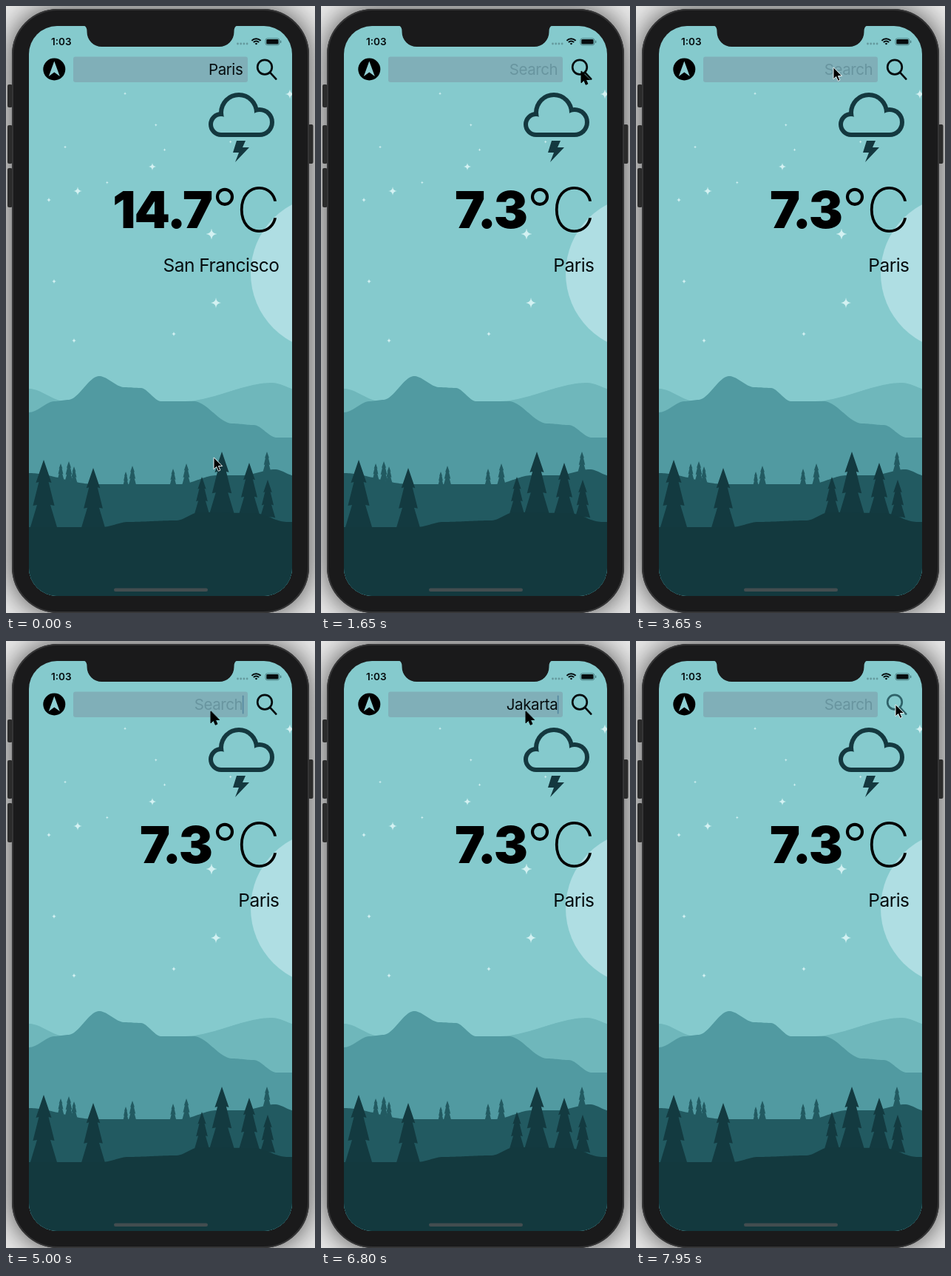
These frames come from a looping animation (418x820 px, 8 s). An HTML page with a canvas:

```html
<!DOCTYPE html>
<html lang="en">
<head>
<meta charset="utf-8">
<title>Weather app</title>
<style>
  html, body { margin: 0; width: 100%; height: 100%; overflow: hidden; background: #aaa; }
  canvas { display: block; width: 418px; height: 820px; }
</style>
</head>
<body>
<canvas id="stage"></canvas>
<script>
const W = 418, H = 820, LOOP = 8000;
const LEFT = 31, RIGHT = 387, TOP = 27, BOTTOM = 797;
const SKY = '#85cacd', DARK = '#14383f', INK = '#050c0e', SHELL = '#1a1a1b';
const FONT = 'Inter, Roboto, "Liberation Sans", sans-serif';
const TAU = Math.PI * 2;
const dpr = window.devicePixelRatio || 1;

const clamp = p => Math.min(1, Math.max(0, p));
const ease = p => p * p * (3 - 2 * p);
const between = (t, a, b) => t >= a && t < b;

function prepare(cv) {
  cv.width = W * dpr;
  cv.height = H * dpr;
  const g = cv.getContext('2d');
  g.scale(dpr, dpr);
  return g;
}

const view = prepare(document.getElementById('stage'));
const backdrop = document.createElement('canvas');
let ctx = prepare(backdrop);

function seeded(seed) {
  return () => (seed = seed * 16807 % 2147483647) / 2147483647;
}

function poly(color, pts) {
  ctx.beginPath();
  pts.forEach(([x, y]) => ctx.lineTo(x, y));
  ctx.closePath();
  ctx.fillStyle = color;
  ctx.fill();
}

function disc(color, x, y, r) {
  ctx.beginPath();
  ctx.arc(x, y, r, 0, TAU);
  ctx.fillStyle = color;
  ctx.fill();
}

function ring(color, x, y, r, width) {
  ctx.beginPath();
  ctx.arc(x, y, r, 0, TAU);
  ctx.strokeStyle = color;
  ctx.lineWidth = width;
  ctx.stroke();
}

function box(color, x, y, w, h, r = 0) {
  ctx.beginPath();
  ctx.roundRect(x, y, w, h, r);
  ctx.fillStyle = color;
  ctx.fill();
}

function label(str, x, y, size, weight, color, align = 'right', spacing = 0) {
  ctx.font = `${weight} ${size}px ${FONT}`;
  ctx.letterSpacing = spacing + 'px';
  ctx.textAlign = align;
  ctx.fillStyle = color;
  ctx.fillText(str, x, y);
}

// Height of a ridge that eases from each key point to the next.
const slope = keys => x => keys.reduce((y, [kx, ky], i) => {
  if (!i) return ky;
  const from = keys[i - 1][0];
  return y + (ky - y) * ease(clamp((x - from) / (kx - from)));
}, 0);

const peaks = slope([[31, 517], [80, 534], [240, 534], [360, 509], [400, 520]]);
const mountain = slope([[31, 549], [66, 534], [84, 532], [126, 500], [160, 515],
  [182, 516], [210, 534], [254, 534], [306, 564], [335, 566], [366, 583]]);
const hill = slope([[31, 631], [120, 646], [235, 646], [285, 634], [320, 634], [364, 626], [392, 635]]);
const ground = slope([[31, 704], [130, 704], [165, 697], [230, 695], [262, 684], [335, 685], [380, 697]]);

function ridge(color, height) {
  const pts = [[LEFT, H]];
  for (let x = LEFT; x <= RIGHT; x += 2) pts.push([x, height(x)]);
  poly(color, [...pts, [RIGHT, H]]);
}

function tree(color, x, top, height) {
  const h = height(x) + 2 - top, half = h * 0.2, tiers = 3;
  const side = [];
  for (let i = 1; i <= tiers; i++) {
    const p = i / tiers, out = (0.35 + 0.65 * p) * half, y = top + p * h;
    side.push([out, y], [out * 0.62, y - 1]);
  }
  const mirrored = side.map(([dx, y]) => [x - dx, y]).reverse();
  poly(color, [[x, top], ...side.map(([dx, y]) => [x + dx, y]), ...mirrored]);
}

function star(x, y, r) {
  const c = r * 0.12;
  ctx.beginPath();
  ctx.moveTo(x + r, y);
  for (let i = 1; i <= 4; i++) {
    const a = i * TAU / 4, mid = a - TAU / 8;
    ctx.quadraticCurveTo(x + c * Math.cos(mid), y + c * Math.sin(mid),
      x + r * Math.cos(a), y + r * Math.sin(a));
  }
  ctx.fillStyle = '#d3f1f2';
  ctx.fill();
}

function drawStars() {
  const bright = [[278, 308], [284, 401], [384, 119], [97, 250], [198, 217]];
  const faint = [[58, 262], [65, 372], [92, 452], [227, 443]];
  bright.forEach(([x, y], i) => star(x, y, 7.5 - i * 0.6));
  faint.forEach(([x, y]) => star(x, y, 3.2));
  const rnd = seeded(11);
  for (let i = 0; i < 6; i++) star(80 + rnd() * 260, 110 + rnd() * 180, 2);
}

function drawBody() {
  box('#ebebeb', 0, 0, W, H);
  ctx.save();
  ctx.shadowColor = 'rgba(0,0,0,.72)';
  ctx.shadowBlur = 38 * dpr;
  box(SHELL, 8, 4, 402, 816, 62);
  ctx.restore();
  [[2, 106, 31], [2, 161, 52], [2, 219, 53], [409, 160, 53]].forEach(([x, y, h]) =>
    box('#2b2b2b', x, y, 6.5, h, 2));
  ctx.beginPath();
  ctx.roundRect(9, 5, 400, 814, 61);
  ctx.strokeStyle = '#353536';
  ctx.lineWidth = 2;
  ctx.stroke();
}

function drawCloud() {
  const lobes = (color, inset) => {
    disc(color, 291, 160, 17 - inset);
    disc(color, 315, 144, 27 - inset);
    disc(color, 343, 157, 20 - inset);
    box(color, 291, 150, 52, 27 - inset);
  };
  lobes(DARK, 0);
  lobes(SKY, 6);
  poly(DARK, [[312, 182], [324, 182], [320, 191], [329, 191], [310, 211], [315, 198], [307, 198]]);
}

function drawScene() {
  box(SKY, LEFT, TOP, RIGHT - LEFT, BOTTOM - TOP);
  disc('#afdee3', 436, 361, 105);
  drawCloud();
  drawStars();

  ridge('#6fb7bb', peaks);
  ridge('#519aa1', mountain);
  const far = '#225a61', near = '#133a40';
  [[74, 618], [85, 615], [92, 622], [162, 629], [171, 621], [226, 625], [244, 618], [353, 602]]
    .forEach(([x, top]) => tree(far, x, top, hill));
  ridge(far, hill);
  [[51, 613], [118, 624], [265, 636], [292, 602], [329, 617], [354, 640]]
    .forEach(([x, top]) => tree(near, x, top, ground));
  ridge('#13393e', ground);
}

function drawNotch() {
  ctx.beginPath();
  ctx.moveTo(102, 26);
  ctx.quadraticCurveTo(109.5, 26, 109.5, 34);
  ctx.arcTo(109.5, 55, 131, 55, 20);
  ctx.arcTo(308.5, 55, 308.5, 34, 20);
  ctx.lineTo(308.5, 34);
  ctx.quadraticCurveTo(308.5, 26, 316, 26);
  ctx.fillStyle = SHELL;
  ctx.fill();
}

function drawStatus() {
  label('1:03', 61, 53, 13.5, 600, INK, 'left');
  for (let i = 0; i < 4; i++) disc('#64999d', 313.5 + i * 4.2, 51, 1.4);

  ctx.strokeStyle = INK;
  ctx.lineWidth = 2;
  [1.5, 5, 8.3].forEach(r => {
    ctx.beginPath();
    ctx.arc(338.5, 52.5, r, -Math.PI * 0.76, -Math.PI * 0.24);
    ctx.stroke();
  });

  ctx.beginPath();
  ctx.roundRect(351, 43.8, 18.8, 9, 2.6);
  ctx.strokeStyle = '#4b7f84';
  ctx.lineWidth = 1;
  ctx.stroke();
  box(INK, 352.3, 45, 16.2, 6.6, 1.4);
  box('#4b7f84', 371, 46.6, 1.3, 3.4, 0.6);
}

function buildBackdrop() {
  drawBody();
  ctx.save();
  ctx.beginPath();
  ctx.roundRect(LEFT, TOP, RIGHT - LEFT, BOTTOM - TOP, 38);
  ctx.clip();
  drawScene();
  drawNotch();
  ctx.restore();
  drawStatus();
  box('#434d50', 146, 786.5, 127, 4.5, 2.2);

  disc('#000', 65.3, 85.5, 15);
  poly('#8fcfd3', [[65.3, 74.5], [72.8, 95], [65.3, 89.6], [57.8, 95]]);
  box('rgba(124,150,163,.5)', 91, 68.5, 236, 34.5, 3);

  ring('#000', 296, 257.8, 10, 4.2);
  label('C', 371.5, 304.5, 83, 250, '#000');
}

const MOVES = [
  [50, 600, 352, 88],
  [2250, 3500, 267, 83],
  [4150, 4700, 277, 95],
  [6850, 7550, 351, 86]
];
const SUBMIT = 900, LOADED = 1200, FOCUS = 4000, RESUBMIT = 7800;
const TYPED = 'Jakarta', TYPE_START = 5300, TYPE_STEP = 180;
const TYPE_END = TYPE_START + TYPE_STEP * (TYPED.length - 1);

function pointer(t) {
  let x = 281, y = 610;
  for (const [a, b, nx, ny] of MOVES) {
    const p = ease(clamp((t - a) / (b - a)));
    x += (nx - x) * p;
    y += (ny - y) * p;
  }
  return [x, y];
}

function query(t) {
  if (t < SUBMIT) return 'Paris';
  if (!between(t, TYPE_START, RESUBMIT)) return '';
  return TYPED.slice(0, 1 + Math.floor((t - TYPE_START) / TYPE_STEP));
}

function caretOn(t) {
  if (t < SUBMIT) return t >= 350;
  if (!between(t, FOCUS, RESUBMIT)) return false;
  if (between(t, TYPE_START, TYPE_END)) return true;
  return (t - (t < TYPE_START ? FOCUS : TYPE_END)) % 1000 < 550;
}

function drawSearchIcon(pressed) {
  const color = pressed ? '#2f6269' : INK;
  ring(color, 350, 82.6, 9.8, 2.7);
  ctx.lineCap = 'round';
  ctx.beginPath();
  ctx.moveTo(357.2, 89.8);
  ctx.lineTo(365.3, 98.6);
  ctx.stroke();
}

function drawPointer(t) {
  const outlined = t < 600 || between(t, 2250, FOCUS) || t >= 6850;
  ctx.save();
  ctx.translate(...pointer(t));
  poly('#000', [[0, 0], [0, 15.8], [3.7, 12.4], [6.3, 18.3], [8.9, 17.1], [6.4, 11.5], [11.3, 11.5]]);
  ctx.strokeStyle = outlined ? '#e4eeee' : '#000';
  ctx.lineWidth = 1;
  ctx.lineJoin = 'round';
  ctx.stroke();
  ctx.restore();
}

function draw(t) {
  ctx.drawImage(backdrop, 0, 0, W, H);
  const text = query(t), loaded = t >= LOADED;
  label(text || 'Search', 320.3, 93.3, 20.5, 400, text ? INK : '#68959f', 'right', -0.4);
  if (caretOn(t)) box('#5689a0', 319.8, 73.5, 1.7, 25, 0.8);
  drawSearchIcon(between(t, SUBMIT, 1150) || t >= RESUBMIT);

  label(loaded ? '7.3' : '14.7', 278, 299.5, 69, 900, '#000', 'right', -2);
  label(loaded ? 'Paris' : 'San Francisco', 369.5, 359.3, 24.5, 400, INK, 'right', -0.5);
  drawPointer(t);
}

buildBackdrop();
ctx = view;
const start = performance.now();
function tick() {
  draw((performance.now() - start) % LOOP);
  requestAnimationFrame(tick);
}
tick();
</script>
</body>
</html>
```
